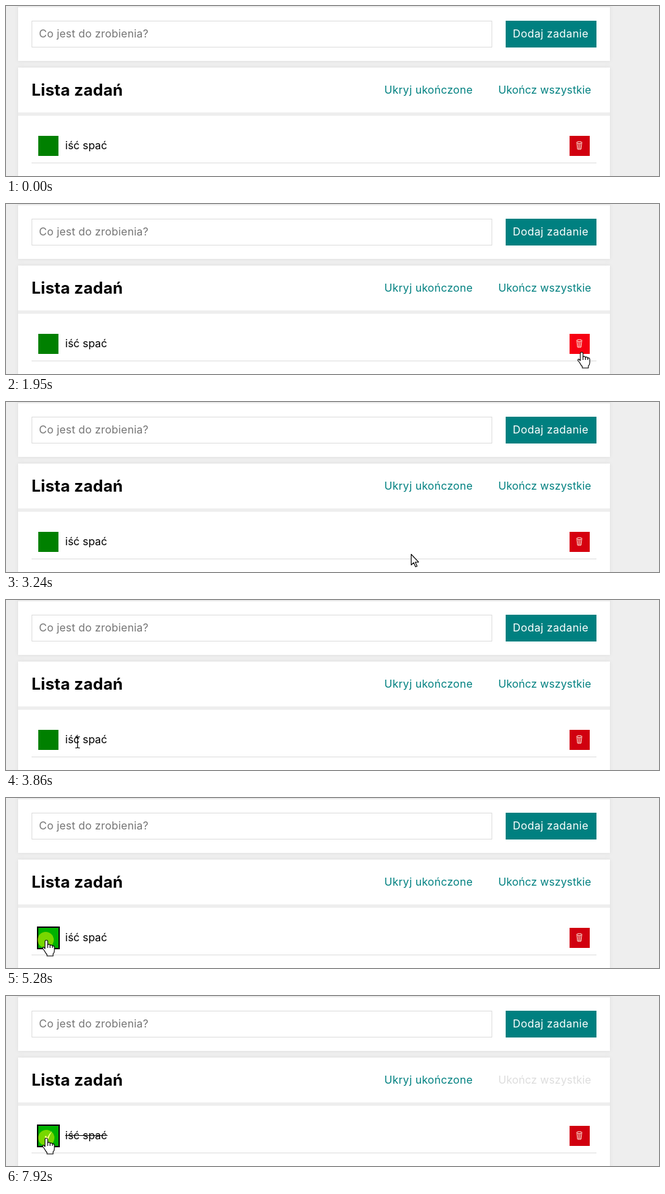
Recreate the animation shown at these times as an HTML page with a canvas. Size 971 by 254 pixels, loop 7990 ms.

```html
<!DOCTYPE html>
<html lang="pl">
<head>
<meta charset="utf-8">
<title>Lista zadań</title>
<style>
html, body { margin: 0; width: 100%; height: 100%; overflow: hidden; background: #eee; }
canvas { display: block; }
</style>
</head>
<body>
<canvas id="stage" width="971" height="254"></canvas>
<script>
const ctx = document.getElementById('stage').getContext('2d');
const LOOP = 7990;
const PRESS = 4810, RELEASE = 6320, PRESS_AGAIN = 7510;
const FONT = 'Inter, "Open Sans", sans-serif';

// Pointer hot spot: time, x, y
const path = [
  [870, 885, 244], [1200, 863, 224.5], [1399, 863, 224.5],
  [1400, 862, 223], [1810, 856, 221], [2410, 855, 221],
  [2690, 843, 220], [2760, 818, 221], [3180, 649, 226],
  [3500, 400, 232], [3860, 106, 213], [3990, 60, 213],
  [4060, 59, 212], [4810, 59, 212], [5280, 60, 212], [LOOP, 60, 212]
];

// Brightness changes: time, new level
const redLevels = [[0, 1], [1400, 1.2], [2700, 1]];
const greenLevels = [[0, 1], [3990, 1.2], [PRESS, 1.4], [RELEASE, 1.2], [PRESS_AGAIN, 1.4]];

const clamp = v => Math.max(0, Math.min(1, v));
const lerp = (a, b, k) => a + (b - a) * k;
const smooth = k => k * k * (3 - 2 * k);
const progress = (t, start, length) => clamp((t - start) / length);

function level(keys, t, length) {
  let value = keys[0][1];
  for (let i = 1; i < keys.length; i++)
    value += (keys[i][1] - keys[i - 1][1]) * smooth(progress(t, keys[i][0], length));
  return value;
}

function pointerAt(t) {
  if (t < path[0][0]) return null;
  const i = path.findIndex(p => p[0] > t);
  const [a, b] = [path[i - 1], path[i]];
  const k = (t - a[0]) / (b[0] - a[0]);
  return { x: lerp(a[1], b[1], k), y: lerp(a[2], b[2], k) };
}

function rect(color, x, y, w, h) {
  ctx.fillStyle = color;
  ctx.fillRect(x, y, w, h);
}

function text(str, x, y, color, size = 16, weight = 400, spacing = 0.2) {
  ctx.font = `${weight} ${size}px ${FONT}`;
  ctx.letterSpacing = spacing + 'px';
  ctx.fillStyle = color;
  ctx.fillText(str, x, y);
}

function line(color, width, ...points) {
  ctx.strokeStyle = color;
  ctx.lineWidth = width;
  ctx.beginPath();
  points.forEach(([x, y]) => ctx.lineTo(x, y));
  ctx.stroke();
}

function panel(y, h) {
  ctx.save();
  ctx.shadowColor = '#ddd';
  ctx.shadowBlur = 5;
  rect('#fff', 18, y, 880, h);
  ctx.restore();
}

function drawForm() {
  panel(-40, 122);
  rect('#eaeaea', 18, 0, 880, 2);
  ctx.strokeStyle = '#ddd';
  ctx.lineWidth = 1;
  ctx.strokeRect(38.5, 22.5, 684, 39);
  text('Co jest do zrobienia?', 49, 47, '#757575');
  rect('#008080', 743, 22, 135, 40);
  text('Dodaj zadanie', 753.5, 47, '#fff', 16, 400, 0.4);
}

function drawHeader(t) {
  panel(92, 200);
  rect('#eee', 18, 159, 880, 5);
  text('Lista zadań', 38, 134, '#000', 24, 700, 0.2);
  text('Ukryj ukończone', 562.5, 131, '#008080', 16, 400, 0.3);
  const k = smooth(progress(t, RELEASE, 500));
  const tint = [[0, 221], [128, 221], [128, 221]].map(([a, b]) => Math.round(lerp(a, b, k)));
  text('Ukończ wszystkie', 732, 131, `rgb(${tint})`, 16, 400, 0.1);
}

function drawTrash(t) {
  const b = level(redLevels, t, 700);
  rect(`rgb(${Math.round(209 * b)},0,${Math.round(15 * b)})`, 838, 194, 30, 30);
  const cream = '#fff0e0';
  ctx.strokeStyle = cream;
  ctx.lineWidth = 1;
  ctx.beginPath();
  ctx.ellipse(852.5, 204, 4, 1.4, 0, 0, 7);
  ctx.stroke();
  line(cream, 1, [849, 205], [850, 214], [855, 214], [856, 205]);
  line(cream, 0.8, [851.5, 206], [851.7, 213.5]);
  line(cream, 0.8, [853.5, 206], [853.3, 213.5]);
}

function drawClick(t) {
  const start = t < PRESS_AGAIN ? PRESS : PRESS_AGAIN;
  if (t < start) return;
  const fade = start === PRESS ? 1 - progress(t, RELEASE, 200) : 1;
  ctx.fillStyle = `rgba(255,255,0,${0.47 * fade})`;
  ctx.beginPath();
  ctx.arc(start === PRESS ? 59 : 60, 212, 12 * progress(t, start - 50, 180), 0, 7);
  ctx.fill();
}

function drawTask(t) {
  const done = t >= RELEASE;
  const focused = (t >= PRESS && !done) || t >= PRESS_AGAIN;
  if (focused) rect('#000', 46, 192, 34, 34);
  rect(`rgb(0,${Math.round(128 * level(greenLevels, t, 400))},0)`, 48, 194, 30, 30);
  if (done) {
    ctx.fillStyle = '#fff';
    ctx.beginPath();
    ctx.moveTo(57.5, 210);
    ctx.lineTo(59.5, 208.8);
    ctx.lineTo(61.3, 211.8);
    ctx.quadraticCurveTo(64, 205.5, 68.5, 202);
    ctx.quadraticCurveTo(64.5, 208, 62.3, 215.5);
    ctx.lineTo(60.5, 215.5);
    ctx.fill();
  }
  text('iść spać', 88, 214, '#000', 16, 400, 0);
  if (done) rect('#000', 88, 208, 63, 1);
  rect('#ddd', 38, 234, 840, 1);
}

const inside = (p, x, y, w, h) => p.x >= x && p.x < x + w && p.y >= y && p.y < y + h;

const hand = new Path2D('M-2 2Q-2 .5 0 .5Q2 .5 2 2V7Q5 6 5.5 8Q8 7 9 9Q12 8.5 12 11V16Q12 19 10 21V24H1V22' +
  'Q-1 20 -3 16L-5.5 13Q-6 10.5 -4 11L-2 13Z');
const knuckles = new Path2D('M2 7V12M5.5 8V12M9 9V12');
const arrow = new Path2D('M.5 .5V16.5L4.2 13L7 19.3L9.3 18.3L6.6 12.2H11.5Z');
const beam = new Path2D('M-3.5 -8.5H-1L0 -7.5L1 -8.5H3.5M0 -7.5V7M-3.5 8H-1L0 7L1 8H3.5');

function drawPointer(p) {
  const overButton = inside(p, 838, 194, 30, 30) || inside(p, 48, 194, 30, 30);
  const overText = inside(p, 88, 198, 63, 20);
  ctx.save();
  ctx.translate(Math.round(p.x), Math.round(p.y));
  ctx.strokeStyle = '#000';
  ctx.fillStyle = '#fff';
  ctx.lineWidth = 1.1;
  ctx.lineJoin = 'round';
  if (overText && !overButton) {
    ctx.translate(0.5, 0);
    ctx.stroke(beam);
  } else {
    const shape = overButton ? hand : arrow;
    ctx.fill(shape);
    ctx.stroke(shape);
    if (overButton) ctx.stroke(knuckles);
  }
  ctx.restore();
}

function draw(now) {
  const t = now % LOOP;
  rect('#eee', 0, 0, 971, 254);
  drawForm();
  drawHeader(t);
  drawTask(t);
  drawTrash(t);
  drawClick(t);
  const p = pointerAt(t);
  if (p) drawPointer(p);
}

const began = performance.now();
function tick() {
  draw(performance.now() - began);
  requestAnimationFrame(tick);
}
tick();
</script>
</body>
</html>
```
